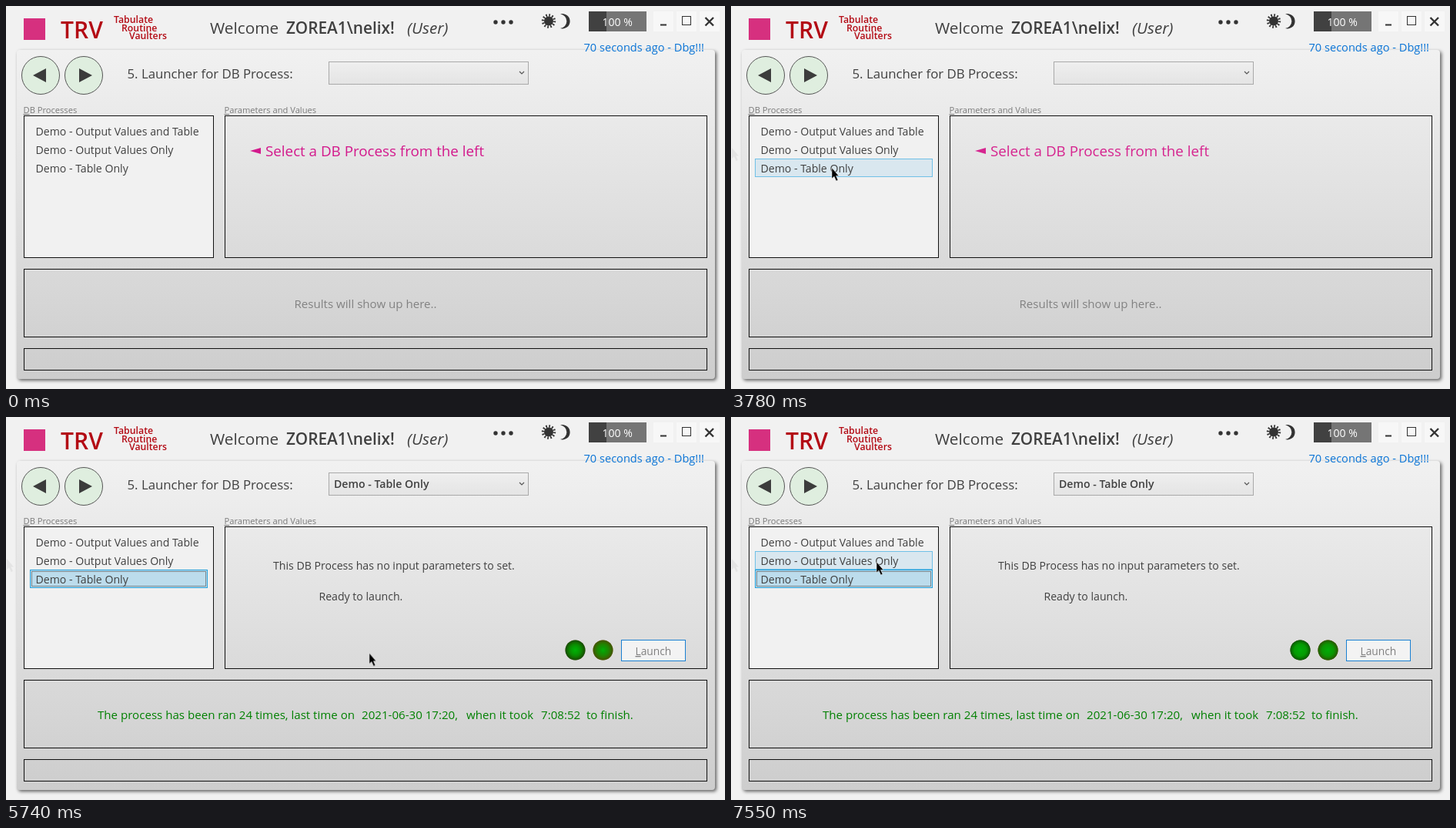
Recreate the animation shown at these times as an HTML page. Size 934x497 px, loop 8 s.

```html
<!DOCTYPE html>
<html lang="en">
<head>
<meta charset="utf-8">
<title>Process launcher</title>
<style>
html, body { margin: 0; width: 100%; height: 100%; overflow: hidden; background: #f1f1f1; }
svg { display: block; width: 934px; height: 497px; font: 14.1px "Open Sans", "Noto Sans", sans-serif; fill: #404040; }
.box { fill: none; stroke: #111; }
.label { font-size: 11.15px; fill: #7a7a7a; }
.title { font-size: 20.8px; }
.brand { fill: #b30a14; font-weight: 600; }
.semi { font-weight: 600; }
.mid { font-size: 15.1px; }
.key { text-decoration: underline; }
.hover { fill: #d9e7ef; stroke: #70c0e7; }
.picked { fill: #bcdcec; stroke: #26a0da; }
.panel { filter: drop-shadow(2px 2px 2px rgba(0, 0, 0, .6)); }

.step { animation: 8s step-end infinite; }
.before { animation-name: before; }
.after { animation-name: after; }
.row2 { animation-name: row2; }
.row3 { animation-name: row3; }
.sel { animation-name: sel; }
.ghost { animation-name: ghost; }
.prompt { fill: #d4208d; animation: pulse 8s ease-in-out infinite; }
.lit { animation: lit 8s linear infinite; }
.cursor { animation: move 8s linear infinite; }

@keyframes before { 0% { opacity: 1 } 50.125%, 100% { opacity: 0 } }
@keyframes after { 0% { opacity: 0 } 50.125%, 100% { opacity: 1 } }
@keyframes row2 { 0% { opacity: 0 } 30% { opacity: 1 } 34.5% { opacity: 0 } 91.75%, 100% { opacity: 1 } }
@keyframes row3 { 0% { opacity: 0 } 34.5% { opacity: 1 } 49.125%, 100% { opacity: 0 } }
@keyframes sel { 0% { opacity: 0 } 49.125%, 100% { opacity: 1 } }
@keyframes ghost { 0% { opacity: 0 } 29.4%, 100% { opacity: .07 } }
@keyframes pulse {
  0% { fill: #d3198c; animation-timing-function: ease-out }
  7%, 33.25% { fill: #cd0c87 }
  20.125%, 46.375%, 100% { fill: #d6258f }
}
@keyframes lit { 0%, 50.125% { opacity: 0 } 62.9% { opacity: .08 } 80.6% { opacity: .85 } 94.4%, 100% { opacity: 1 } }
@keyframes move {
  0%, 28.49% { transform: translate(-30px, 184px) }
  28.5% { transform: translate(1px, 184px) }
  33.5% { transform: translate(98px, 199px) }
  38.25%, 66.6% { transform: translate(131px, 210px) }
  69.5% { transform: translate(324px, 286px) }
  72.5% { transform: translate(520px, 313px) }
  76.25% { transform: translate(660px, 315px) }
  80%, 81.6% { transform: translate(709px, 310px) }
  85.6% { transform: translate(500px, 230px) }
  89.25%, 90.6% { transform: translate(309px, 187px) }
  94.375%, 100% { transform: translate(189px, 188px) }
}
</style>
</head>
<body>
<svg viewBox="0 0 934 497">
  <defs>
    <linearGradient id="shade" x2="0" y2="1">
      <stop stop-color="#f1f1f1"/><stop offset="1" stop-color="#cdcdcd"/>
    </linearGradient>
    <linearGradient id="field" x2="0" y2="1">
      <stop stop-color="#efefef"/><stop offset="1" stop-color="#e4e4e4"/>
    </linearGradient>
    <radialGradient id="dimA">
      <stop stop-color="#00b806"/><stop offset=".35" stop-color="#089a02"/><stop offset="1" stop-color="#263c00"/>
    </radialGradient>
    <radialGradient id="dimB">
      <stop stop-color="#04b006"/><stop offset=".3" stop-color="#179002"/><stop offset="1" stop-color="#5e4c00"/>
    </radialGradient>
    <radialGradient id="litA">
      <stop stop-color="#00ac08"/><stop offset=".6" stop-color="#049c04"/><stop offset="1" stop-color="#0a5a00"/>
    </radialGradient>
    <radialGradient id="litB">
      <stop stop-color="#02ac08"/><stop offset=".6" stop-color="#0c9604"/><stop offset="1" stop-color="#285a00"/>
    </radialGradient>
    <path id="arrow" d="M0 0V14L3 11.2 5.6 17 8 16 5.5 10.4H9Z"/>
  </defs>

  <rect width="934" height="497" fill="#f1f1f1"/>

  <!-- header -->
  <rect x="23" y="16" width="28" height="28" fill="#d6307f"/>
  <g class="brand">
    <text x="71" y="41.5" font-size="30">TRV</text>
    <g font-size="12.3">
      <text x="140" y="22">Tabulate</text>
      <text x="150" y="32.5">Routine</text>
      <text x="160" y="43">Vaulters</text>
    </g>
  </g>
  <g class="title">
    <text x="265" y="36">Welcome</text>
    <text x="364" y="36" class="semi">ZOREA1\nelix!</text>
    <text x="521" y="36" font-style="italic">(User)</text>
  </g>
  <g fill="#333">
    <circle cx="636" cy="21" r="2.7"/><circle cx="646" cy="21" r="2.7"/><circle cx="656" cy="21" r="2.7"/>
    <circle cx="705" cy="19.5" r="6"/>
    <circle cx="705" cy="19.5" r="7.5" fill="none" stroke="#333" stroke-width="3.4" stroke-dasharray="1.7 2.227"/>
    <path d="M720 10.5A9.7 9.7 0 1 1 720 29A9.3 9.3 0 0 0 720 10.5Z"/>
  </g>
  <rect x="757" y="7" width="75" height="26" fill="#757575"/>
  <rect x="757" y="7" width="23" height="26" fill="#414141"/>
  <text x="774.5" y="25.5" fill="#fff">100 %</text>
  <g fill="#f7f7f7">
    <rect x="841" y="7" width="26" height="26"/><rect x="871" y="7" width="26" height="26"/><rect x="901" y="7" width="26" height="26"/>
  </g>
  <g fill="none" stroke="#333">
    <path d="M850 24.5H858" stroke-width="2"/>
    <rect x="878.5" y="13.5" width="11" height="11"/>
    <path d="M908.5 15L919 25.5M919 15L908.5 25.5" stroke-width="2.4"/>
  </g>

  <!-- main panel -->
  <rect class="panel" x="14" y="57" width="907" height="427" rx="4" fill="url(#shade)"/>
  <text x="750.5" y="59" font-size="14.6" fill="#0a74d6">70 seconds ago - Dbg!!!</text>
  <g fill="#dfeedf" stroke="#555">
    <circle cx="45" cy="90" r="24.5"/><circle cx="101" cy="90" r="24.5"/>
  </g>
  <path d="M35 90L52 81V99ZM112 90L95 81V99Z" fill="#3c3c3c"/>
  <text x="157.5" y="94" font-size="16.8">5. Launcher for DB Process:</text>
  <rect x="419.5" y="72.5" width="259" height="29" fill="url(#field)" stroke="#a9a9a9"/>
  <path d="M667 85L670 88 673 85" fill="none" stroke="#555" stroke-width="1.2"/>

  <text class="label" x="22.5" y="139"><tspan class="key">D</tspan>B Processes</text>
  <text class="label" x="283.5" y="139"><tspan class="key">P</tspan>arameters and Values</text>
  <rect class="box" x="23.5" y="142.5" width="246" height="184" style="fill:#f1f1f1"/>
  <rect class="box" x="284.5" y="142.5" width="626" height="184"/>
  <rect class="box" x="23.5" y="341.5" width="887" height="88"/>
  <rect class="box" x="23.5" y="444.5" width="887" height="28"/>

  <!-- process list -->
  <rect class="step hover row2" x="31.5" y="174.5" width="230" height="23"/>
  <rect class="step hover row3" x="31.5" y="198.5" width="230" height="23"/>
  <g class="step sel">
    <rect class="picked" x="31.5" y="198.5" width="230" height="23"/>
    <rect x="33.5" y="200.5" width="226" height="19" fill="none" stroke="#333" stroke-dasharray="1 1"/>
  </g>
  <text x="38.5" y="168">Demo - Output Values and Table</text>
  <text x="38.5" y="192">Demo - Output Values Only</text>
  <text x="38.5" y="216">Demo - Table Only</text>

  <!-- nothing selected -->
  <g class="step before">
    <g class="prompt">
      <path d="M317 188L331 184V192Z"/>
      <text x="337" y="195" font-size="18.8">Select a DB Process from the left</text>
    </g>
    <text class="mid" x="374.5" y="392" fill="#828282">Results will show up here..</text>
  </g>

  <!-- process selected -->
  <g class="step after">
    <text class="semi" x="426" y="92">Demo - Table Only</text>
    <text x="347" y="198">This DB Process has no input parameters to set.</text>
    <text x="406.5" y="238">Ready to launch.</text>
    <circle cx="739.5" cy="302.5" r="13" fill="url(#dimA)"/>
    <circle cx="775.5" cy="302.5" r="13" fill="url(#dimB)"/>
    <g class="lit">
      <circle cx="739.5" cy="302.5" r="13" fill="url(#litA)"/>
      <circle cx="775.5" cy="302.5" r="13" fill="url(#litB)"/>
    </g>
    <rect x="799.5" y="289.5" width="83" height="27" fill="#f3f3f3" stroke="#1a80d2"/>
    <text x="817.5" y="309" font-size="13.8" fill="#808080"><tspan class="key">L</tspan>aunch</text>
    <g class="mid" fill="#008000">
      <text x="119" y="392">The process has been ran 24 times, last time on</text>
      <text x="462" y="392">2021-06-30 17:20,</text>
      <text x="598" y="392">when it took</text>
      <text x="695" y="392">7:08:52</text>
      <text x="754" y="392">to finish.</text>
    </g>
  </g>

  <use class="step ghost" href="#arrow" x="1" y="184"/>
  <g class="cursor"><use href="#arrow" fill="#000" stroke="#fff" stroke-width=".5"/></g>
</svg>
</body>
</html>
```
